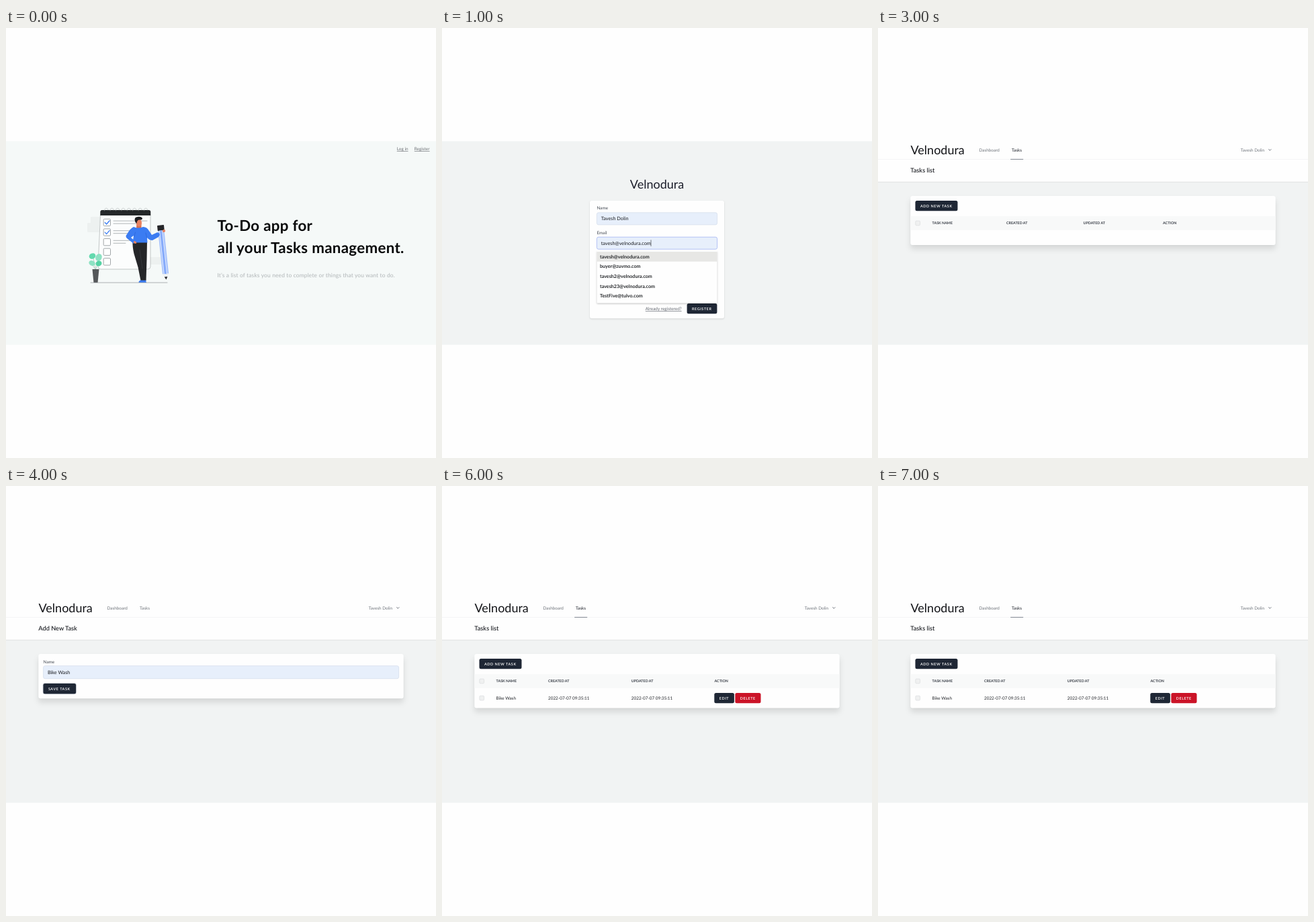
An HTML page that plays this animation: 640 px wide and 640 px high, repeating every 8 s.

```html
<!DOCTYPE html>
<html lang="en">
<head>
<meta charset="utf-8">
<title>To-do app tour</title>
<style>
  html, body { margin: 0; width: 100%; height: 100%; overflow: hidden; background: #fefefe; }
  svg { display: block; width: 100vw; height: 100vh; }
  text { font-family: Lato, "Open Sans", sans-serif; text-rendering: geometricPrecision; white-space: pre; }
  .card { fill: #fefefe; filter: drop-shadow(0 6px 4px rgba(0, 0, 0, .11)) drop-shadow(0 1px 1.5px rgba(0, 0, 0, .03)); }
  .form { fill: #fefefe; filter: drop-shadow(0 1px 1.2px rgba(0, 0, 0, .13)); }
  .menu { fill: #fefefe; filter: drop-shadow(0 1px 1px rgba(0, 0, 0, .25)); }
  .line { fill: none; stroke-linecap: round; stroke-linejoin: round; }
</style>
</head>
<body>
<svg id="stage" viewBox="0 0 640 640"></svg>
<script>
const BRAND = 'Velnodura', USER = 'Tavesh Dolin';
const DARK = '#1f2735', RED = '#cb1428', BLUE = '#3b7cf2', INK = '#24262b', GREY = '#70757c';

const rect = (x, y, w, h, fill, r = 0, more = '') =>
  `<rect x="${x}" y="${y}" width="${w}" height="${h}" rx="${r}" fill="${fill}" ${more}/>`;
const box = (cls, x, y, w, h, r = 3) =>
  `<rect class="${cls}" x="${x}" y="${y}" width="${w}" height="${h}" rx="${r}"/>`;
const text = (x, y, str, size, fill = INK, weight = 400, more = '') =>
  `<text x="${x}" y="${y}" font-size="${size}" fill="${fill}" font-weight="${weight}" ${more}>${str}</text>`;
const line = (d, stroke, width = 1) =>
  `<path class="line" d="${d}" stroke="${stroke}" stroke-width="${width}"/>`;
const shape = (d, fill) => `<path d="${d}" fill="${fill}"/>`;
const oval = (x, y, rx, ry, fill, turn = 0) =>
  `<ellipse cx="${x}" cy="${y}" rx="${rx}" ry="${ry}" fill="${fill}" transform="rotate(${turn} ${x} ${y})"/>`;
const spaced = em => `letter-spacing="${em}em"`;

const backdrop = fill => rect(0, 168.5, 640, 303, fill);
const button = (x, y, w, label, fill = DARK) =>
  rect(x, y, w, 15.3, fill, 2.5) + text(x + 7.4, y + 9.6, label, 5.5, '#fff', 600, spaced(.1));
const field = (x, y, w, h, str, stroke = '#d6dfec') =>
  rect(x, y, w, h, '#e7effb', 2.5, `stroke="${stroke}" stroke-width=".8"`) +
  text(x + 6.3, y + h / 2 + 2.4, str, 7.3, '#1b1d21');

function pad() {
  let s = shape('M140.5 275L137 355Q137 359 141 359H211Q215 359 215 355V275Z', '#fcfdfd') +
    line('M140.5 279L137 355Q137 359 141 359H211Q215 359 215 355V279', '#9da3a3', .6) +
    shape('M140.3 279V274Q140.3 271 143 271H212.5Q215.3 271 215.3 274V279Z', '#25282a');
  for (let x = 149; x < 211; x += 8.4) s += line(`M${x - 2.5} 272C${x - 3} 267 ${x + 3} 267 ${x + 3} 271`, '#a3a9a9', .5);
  for (let i = 0; i < 5; i++) {
    const y = 284.3 + i * 14.6;
    s += rect(145.2, y, 10.3, 10.3, '#fff', 1.3, 'stroke="#8b9194" stroke-width=".8"');
    if (i < 2) s += line(`M147.3 ${y + 5.2}l2.3 2.5l4.5 -5.2`, BLUE, 1.3);
    if (i < 3) s += line(`M160 ${y + 2.8}h${i ? 27 : 50}M160 ${y + 6.8}h${[40, 24, 18][i]}`, '#8f9598', .7);
  }
  return s;
}

function person() {
  return shape('M188.5 317H210L209.5 345L208.5 376H200.5L196.5 356L190.5 336Q188 325 188.5 317Z', '#252629') +
    line('M199 330L203 358', '#44464a', .5) +
    shape('M199.5 375.5H208L209 379H197.5Q197 377 199.5 375.5Z', BLUE) +
    shape('M194.5 289H201.5V299H194Z', '#d8704f') +
    oval(198, 290, 4, 5.4, '#e88261') +
    shape('M192.5 289Q190 283 194 281.5Q200 279.5 203 283Q203 286 199 285.5Q195 285 194.5 291Z', '#1e1f22') +
    shape('M190 296Q197 299 204 296Q210 296 213 302L217 308L225.5 304L228 310.5L218 316Q213 316 210 312L210.5 319.5H188.5L190 309Q187 311 186 312L193 318L190 321L180 313Q177 310 180 307Q185 298 190 296Z', BLUE) +
    line('M191 310L192.5 304M209.5 312L208 305', '#2a60cc', .6) +
    oval(192, 319, 2.4, 1.7, '#e88261', 25);
}

function pencil() {
  return `<g transform="rotate(-6 230 294)">` +
    rect(225, 293.5, 10, 8, '#252629', .8) + rect(225.4, 301.5, 9.2, 65, '#a9c4fc') +
    rect(228.2, 301.5, 3.2, 65, '#86abfa') + line('M227.6 302V366M232 302V366', '#f3f7ff', .7) +
    shape('M225.4 366.5H234.6L230 375Z', '#eef1f3') + shape('M227.7 370.7H232.3L230 375Z', '#252629') +
    `</g>` + oval(235, 302, 2.2, 2, '#e88261', -30) + oval(226.5, 307.5, 2.2, 2.8, BLUE);
}

function plant() {
  return line('M133.5 360L129 338M133.5 360L139 340M133.5 360L127 350', '#8cb9a6', .6) +
    oval(128.5, 339.5, 5, 4.2, '#62d9ae', -25) + oval(138, 341.5, 4.6, 5.6, '#8ee2c3', 25) +
    oval(128, 350, 4.8, 3.8, '#8ee2c3', 20) + oval(138, 350.5, 4.6, 4, '#56d2a4', -20) +
    shape('M128.5 359H138.5L136.5 379H130.5Z', '#55585a');
}

function landing() {
  const link = 'text-decoration="underline"';
  return backdrop('#f5f9f8') +
    text(581.8, 182, 'Log in', 6.4, '#6b6f74', 400, link) + text(607.8, 182, 'Register', 6.4, '#6b6f74', 400, link) +
    rect(126, 281, 14, 10, '#edf1f0', 1) + rect(121, 290, 18, 14, '#edf1f0', 1) +
    rect(214, 341, 17, 11, '#edf1f0', 1) +
    pad() + plant() + person() + pencil() + line('M126 379H240', '#8c9192', .7) +
    text(314.5, 302.3, 'To-Do app for', 22.3, '#08090a', 700, spaced(.0135)) +
    text(314.5, 334.7, 'all your Tasks management.', 22.3, '#08090a', 700, spaced(.0145)) +
    text(314.5, 370.6, 'It’s a list of tasks you need to complete or things that you want to do.', 8.5, '#b1b6b8', 400, spaced(.0135));
}

function register() {
  const name = USER.split(' ')[0].toLowerCase(), host = '@' + BRAND.toLowerCase() + '.com';
  const mails = [name + host, 'buyer@zuvmo.com', name + '2' + host, name + '23' + host, 'TestFive@tulvo.com'];
  return backdrop('#f1f3f3') +
    text(320, 238.5, BRAND, 18, '#1c1e2b', 400, 'text-anchor="middle"') +
    box('form', 220, 257, 200, 175.3) +
    text(230.5, 270.3, 'Name', 6.4, '#454b55') + field(230.4, 274.8, 179.2, 18, USER) +
    text(230.5, 307, 'Email', 6.4, '#454b55') + field(230.4, 311.2, 179.2, 18, mails[0], '#a4b4f3') +
    line('M311 315.8V324.5', '#222', .6) +
    text(302.8, 420, 'Already registered?', 6.4, '#60656e', 400, 'text-decoration="underline"') +
    button(364.6, 410, 44.8, 'REGISTER') +
    box('menu', 230.5, 332, 179, 77.5, 1) + rect(230.5, 333, 179, 14.6, '#e7e7e5') +
    mails.map((m, i) => text(235, 342.7 + i * 14.6, m, 7.15, '#26282b', 700)).join('');
}

function shell(title, active) {
  const tab = (x, w, name) => {
    const on = name === active;
    return text(x, 183.8, name, 6.4, on ? '#1c2028' : GREY) + (on ? rect(x - 1.8, 194.9, w, .9, '#737a85') : '');
  };
  return backdrop('#f1f3f3') + rect(0, 168, 640, 61, '#fefefe') +
    rect(0, 195, 640, .6, '#eff1f2') + rect(0, 228.8, 640, .9, '#dfe2e2') +
    text(48.5, 187.5, BRAND, 18, '#141519') +
    tab(150.5, 34, 'Dashboard') + tab(199, 19, 'Tasks') +
    text(539.8, 183.5, USER, 6.3, GREY) + line('M581.6 180.6L583.3 182.3L585 180.6', '#5d646e', .9) +
    text(48.3, 215, title, 9.2, INK, 600);
}

function dashboard() {
  const title = (y, str) => text(91.3, y, str, 26.4, '#0a0a0c', 700, spaced(.0085));
  const para = (y, str) => text(91.5, y, str, 8.8, '#7d8084', 400, spaced(.0195));
  return shell('Dashboard', 'Dashboard') + box('card', 48.3, 250, 543.4, 201.5) +
    title(311.8, 'Basic To-Do app for') + title(338.5, 'your Task-lists') +
    para(359, 'What is a ToDo List? The definition is a simple one. It’s a list of') +
    para(371.7, 'tasks you need to complete or things that you want to do.') +
    rect(91.6, 389.4, 69.6, 22, '#fefefe', 2.5, 'stroke="#e0e3e5" stroke-width=".8"') +
    text(100.6, 402.6, 'Go to your tasks', 7.3, '#222429');
}

function addTask() {
  return shell('Add New Task') + box('card', 48.3, 250, 543.4, 66.2) +
    text(55.6, 263.8, 'Name', 6.4, '#454b55') + field(55.6, 267.7, 529, 19, 'Bike Wash') +
    rect(54.8, 293.3, 50, 16.7, '#c3c8d0', 3) + button(55.5, 294, 48.6, 'SAVE TASK');
}

function tick(y, on) {
  return rect(55.9, y - 3.3, 6.7, 6.7, on ? '#2f5bd3' : '#f0f1f1', 1.4, on ? '' : 'stroke="#d3d6d9" stroke-width=".6"') +
    (on ? line(`M57.5 ${y + .2}l1.3 1.3l2.4 -2.7`, '#fff', .9) : '');
}

function taskList(rows, cols, bottom, on) {
  const [a, b, c] = cols;
  let s = shell('Tasks list', 'Tasks') + box('card', 48.3, 250, 543.4, bottom - 250) +
    button(55.5, 257, 63, 'ADD NEW TASK') + rect(48.3, 280, 543.4, 20.8, '#f8f9f9') + tick(290.4, false);
  [80.6, a, b, c].forEach((x, i) =>
    s += text(x, 292.2, ['TASK NAME', 'CREATED AT', 'UPDATED AT', 'ACTION'][i], 5.35, '#3a3f48', 700));
  rows.forEach(([name, time], i) => {
    const y = 315.6 + i * 30;
    if (i) s += rect(48.3, y - 15.2, 543.4, .6, '#e9ebec');
    s += tick(y, on) + text(80.6, y + 2.2, name, 6.4);
    for (const x of [a, b]) s += text(x, y + 2.2, '2022-07-07 ' + time, 6.4);
    s += button(c - .2, y - 7.6, 29.6, 'EDIT') + button(c + 30.8, y - 7.6, 38.2, 'DELETE', RED);
  });
  return s;
}

const bike = ['Bike Wash', '09:35:11'], bill = ['Pay Electricity Bill', '09:35:16'];
const emptyList = taskList([], [191, 305.5, 424], 323, false);
const fullList = taskList([bike, bill], [181, 298, 415.8], 360.6, true);
const lastList = taskList([bike], [158, 281.8, 405.5], 330.6, false);

// One scene per second, with hard cuts.
const STEP = 1000;
const scenes = [landing(), register(), dashboard(), emptyList, addTask(), fullList, lastList, lastList];
const stage = document.getElementById('stage');
stage.innerHTML = rect(0, 0, 640, 640, '#fefefe') + scenes.map(s => `<g display="none">${s}</g>`).join('');
const groups = [...stage.children].slice(1);

const start = performance.now();
let shown = -1;
function draw(now) {
  const i = Math.floor(Math.max(0, now - start) / STEP) % groups.length;
  if (i !== shown) {
    groups.forEach((g, k) => g.setAttribute('display', k === i ? 'inline' : 'none'));
    shown = i;
  }
  requestAnimationFrame(draw);
}
draw(start);
</script>
</body>
</html>
```
